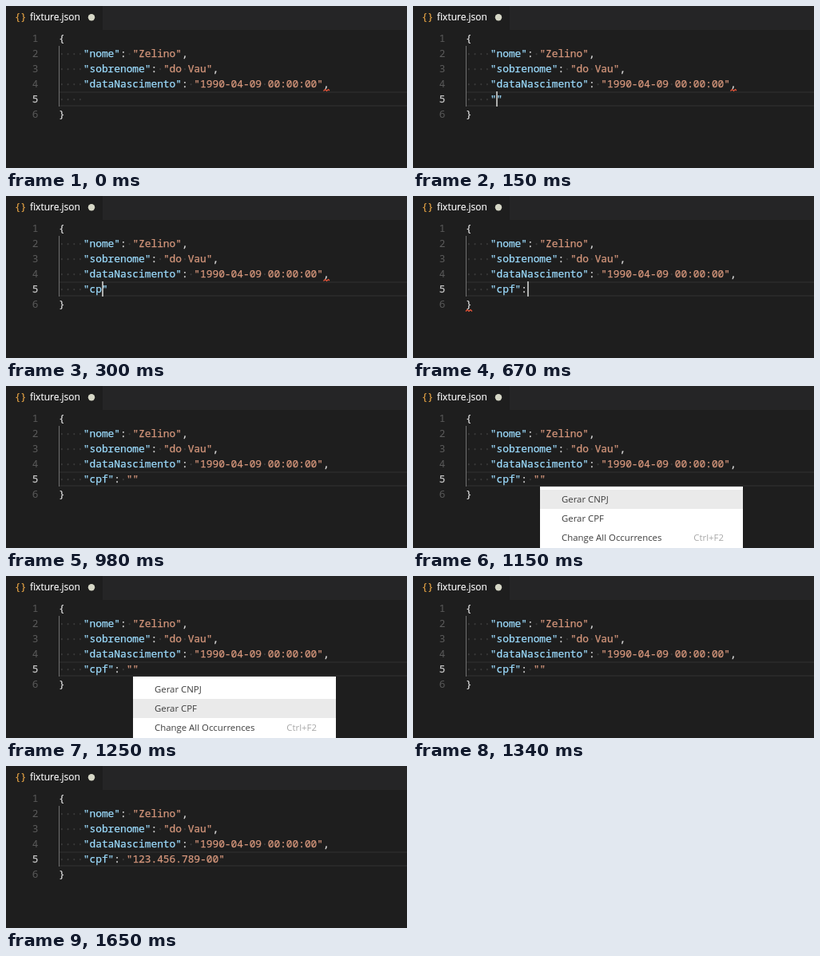
An HTML page that plays this animation: 502x203 px, repeating every 1.72 s.

```html
<!DOCTYPE html>
<html lang="pt-BR">
<head>
<meta charset="utf-8">
<title>fixture.json</title>
<style>
  html, body { margin: 0; width: 100%; height: 100%; overflow: hidden; background: #1e1e1e; }
  svg { display: block; width: 502px; height: 203px; }
  text { white-space: pre; }
  .code {
    font: 12.83px "Noto Sans Mono", "DejaVu Sans Mono", monospace;
    color: #dcdcdc; fill: currentColor; stroke: currentColor; stroke-width: .25px;
  }
  .code tspan { fill: currentColor; stroke: currentColor; }
  .ui { font: 11.4px "Open Sans", "Noto Sans", sans-serif; }
  .tab { font-size: 12px; fill: #fff; stroke: #fff; stroke-width: .15px; }
  .icon { font-size: 12px; color: #e2a144; }
  .num { color: #5a5a5a; text-anchor: end; stroke: none; }
  .num.on { color: #c6c6c6; stroke: currentColor; }
  .key { color: #9cdcfe; }
  .str { color: #d6977c; }
  .dot { color: #404040; }
  .wave { fill: none; stroke: #f0593c; stroke-width: 1.2; }
</style>
</head>
<body>
<svg viewBox="0 0 502 203">
  <rect width="502" height="203" fill="#1e1e1e"/>
  <rect x="121" width="381" height="30" fill="#252526"/>
  <text x="11" y="18" class="code icon">{}</text>
  <text x="30" y="18" class="ui tab">fixture.json</text>
  <circle cx="107" cy="14.2" r="4.2" fill="#d6d7c6"/>

  <g fill="#282828">
    <rect x="66" y="107" width="436" height="2"/>
    <rect x="66" y="124" width="436" height="2"/>
  </g>
  <rect x="66" y="50" width="1" height="76" fill="#707070"/>
  <g id="lines"></g>
  <path id="commaWave" class="wave" d="M397.5 106.5l2-2 2 2 2-2 1.5 1.5"/>
  <path id="braceWave" class="wave" d="M66 144.5l2-2 2 2 2-2 2 2"/>
  <rect id="caret" y="107" width="2" height="19" fill="#aeafad"/>

  <g id="menu" class="ui" fill="#3c3c3c">
    <rect x="159" y="126" width="254" height="77" fill="#fff"/>
    <rect id="hover" x="159" width="254" height="24" fill="#eaeaea"/>
    <text x="186" y="146">Gerar CNPJ</text>
    <text x="186" y="170">Gerar CPF</text>
    <text x="186" y="194">Change All Occurrences</text>
    <text x="389" y="194" text-anchor="end" fill="#a8a8a8">Ctrl+F2</text>
  </g>
</svg>
<script>
const LOOP = 1720, LEFT = 66, TOP = 31, ROW = 19, CHAR = 7.698;
const $ = id => document.getElementById(id);
const CPF = '"cpf": "123.456.789-00"';

// at: ms, text: line 5, col: caret column, wave: error marker,
// row: hovered menu item (-1 = none, absent = closed)
const steps = [
  { at: 0, text: '', wave: 'comma' },
  { at: 80, text: '', col: 0, wave: 'comma' },
  { at: 150, text: '""', col: 1, wave: 'comma' },
  { at: 220, text: '"c"', col: 2, wave: 'comma' },
  { at: 300, text: '"cp"', col: 3, wave: 'comma' },
  { at: 380, text: '"cpf"', col: 4, wave: 'comma' },
  { at: 450, text: '"cpf"', col: 5, wave: 'comma' },
  { at: 520, text: '"cpf"', col: 5 },
  { at: 590, text: '"cpf":', col: 6 },
  { at: 670, text: '"cpf":', col: 6, wave: 'brace' },
  { at: 750, text: '"cpf": ', col: 7, wave: 'brace' },
  { at: 830, text: '"cpf": ""', col: 8, wave: 'brace' },
  { at: 910, text: '"cpf": ""', col: 8 },
  { at: 980, text: '"cpf": ""' },
  { at: 1060, text: '"cpf": ""', row: -1 },
  { at: 1150, text: '"cpf": ""', row: 0 },
  { at: 1250, text: '"cpf": ""', row: 1 },
  { at: 1340, text: '"cpf": ""' },
  { at: 1420, text: '"cpf": ""', col: 8 },
  { at: 1500, text: CPF, col: 8 },
  { at: 1570, text: CPF, col: CPF.length - 1 },
  { at: 1650, text: CPF }
];

function paint(line) {
  const span = (cls, s) => `<tspan class="${cls}">${s}</tspan>`;
  return line.replace(/"[^"]*"| +/g, (s, i) =>
    s.split(/( +)/).filter(Boolean).map(part =>
      part[0] === ' ' ? span('dot', '·'.repeat(part.length))
                      : span(i === 4 ? 'key' : 'str', part)).join(''));
}

const source = [
  '{',
  '    "nome": "Zelino",',
  '    "sobrenome": "do Vau",',
  '    "dataNascimento": "1990-04-09 00:00:00",',
  '    ',
  '}'
];
$('lines').innerHTML = source.map((line, i) => {
  const y = TOP + i * ROW + 14;
  return `<text class="code num${i === 4 ? ' on' : ''}" x="40.5" y="${y}">${i + 1}</text>` +
    `<text class="code" id="line${i + 1}" x="${LEFT}" y="${y}">${paint(line)}</text>`;
}).join('');

const show = (id, on) => $(id).setAttribute('visibility', on ? 'inherit' : 'hidden');
let current;

function draw(step) {
  $('line5').innerHTML = paint('    ' + step.text);
  show('commaWave', step.wave === 'comma');
  show('braceWave', step.wave === 'brace');
  show('caret', step.col !== undefined);
  $('caret').setAttribute('x', Math.round(LEFT + (4 + (step.col || 0)) * CHAR));
  show('menu', step.row !== undefined);
  show('hover', step.row >= 0);
  $('hover').setAttribute('y', 130 + 24 * Math.max(0, step.row || 0));
}

function tick() {
  const t = performance.now() % LOOP;
  const step = steps.filter(s => s.at <= t).pop();
  if (step !== current) draw(current = step);
  requestAnimationFrame(tick);
}
tick();
</script>
</body>
</html>
```
